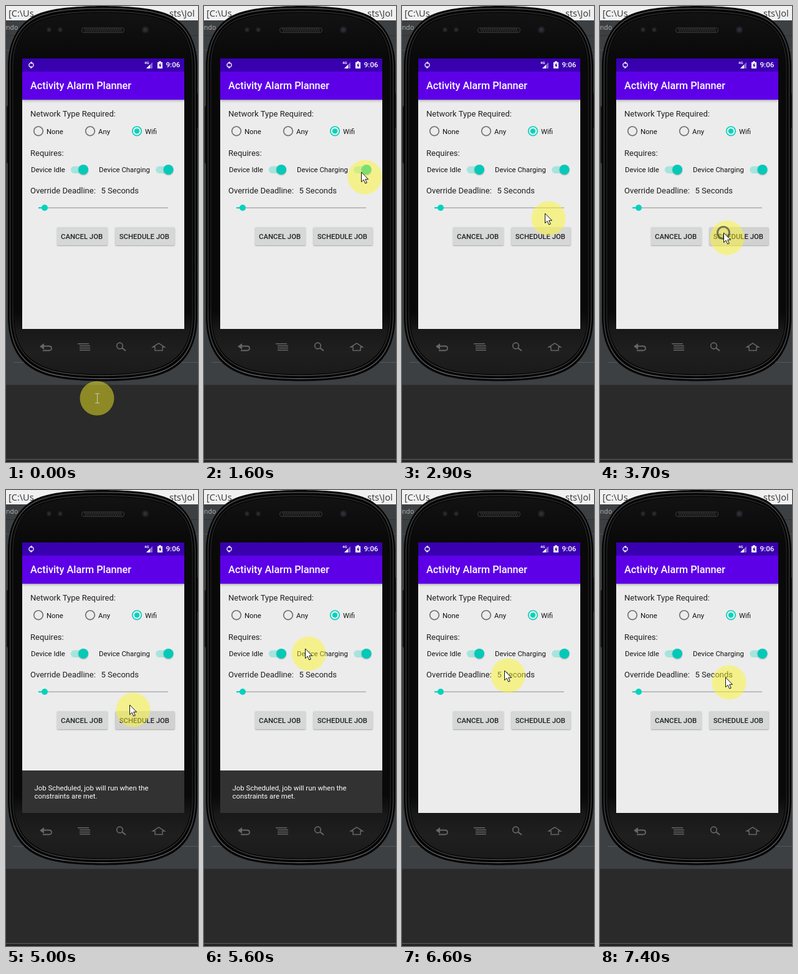
Recreate the animation shown at these times as an HTML page with a canvas. Size 308 px wide and 730 px high, loop 8 s.

```html
<!DOCTYPE html>
<html lang="en">
<head>
<meta charset="utf-8">
<title>Job demo</title>
<style>
  html, body { margin: 0; width: 100%; height: 100%; overflow: hidden; background: #2a2a2a; }
  canvas { display: block; }
</style>
</head>
<body>
<canvas id="stage" width="308" height="730"></canvas>
<script>
const ctx = document.getElementById('stage').getContext('2d');
const LOOP = 8000, STEP = 100;
const TEAL = '#04d2bd', INK = '#212121';

// Pointer highlight centre: [ms, x, y]
const route = [
  [0, 146, 628], [800, 146, 628], [900, 142, 590], [1100, 130, 420],
  [1300, 165, 270], [1400, 205, 233], [1500, 245, 250], [1600, 258, 274],
  [1700, 258, 268], [1800, 252, 240], [1900, 225, 198], [2000, 190, 182],
  [2100, 150, 200], [2200, 118, 250], [2300, 108, 313], [2400, 117, 302],
  [2500, 140, 296], [2600, 179, 288], [2700, 222, 264], [2800, 256, 292],
  [2900, 235, 340], [3000, 204, 364], [3100, 204, 364], [3300, 204, 371],
  [4900, 204, 371], [5000, 204, 352], [5200, 190, 290], [5400, 178, 236],
  [5600, 168, 262], [5800, 166, 288], [6000, 170, 297], [6600, 170, 297],
  [6700, 171, 286], [6800, 177, 286], [7000, 194, 298], [7200, 207, 308]
];

const clamp = v => Math.max(0, Math.min(1, v));
const ease = v => v * v * (3 - 2 * v);

function pointerAt(t) {
  const i = route.findIndex(k => k[0] > t);
  if (i < 0) return route[route.length - 1].slice(1);
  const [t0, x0, y0] = route[i - 1], [t1, x1, y1] = route[i];
  const p = (t - t0) / (t1 - t0);
  return [x0 + (x1 - x0) * p, y0 + (y1 - y0) * p];
}

function rect(x, y, w, h, fill) {
  ctx.fillStyle = fill;
  ctx.fillRect(x, y, w, h);
}

function round(x, y, w, h, r, fill) {
  ctx.beginPath();
  ctx.roundRect(x, y, w, h, r);
  ctx.fillStyle = fill;
  ctx.fill();
}

function disc(x, y, r, fill) {
  ctx.beginPath();
  ctx.arc(x, y, r, 0, 7);
  ctx.fillStyle = fill;
  ctx.fill();
}

function ring(x, y, r, width, color) {
  ctx.beginPath();
  ctx.arc(x, y, r, 0, 7);
  ctx.lineWidth = width;
  ctx.strokeStyle = color;
  ctx.stroke();
}

function line(d, width, color) {
  ctx.lineWidth = width;
  ctx.strokeStyle = color;
  ctx.stroke(new Path2D(d));
}

function shape(d, fill) {
  ctx.fillStyle = fill;
  ctx.fill(new Path2D(d));
}

function text(str, x, y, size = 11.375, color = '#111', weight = 400, family = 'Roboto') {
  ctx.font = `${weight} ${size}px ${family}, sans-serif`;
  ctx.fillStyle = color;
  ctx.fillText(str, x, y);
}

function shadow(blur, dy, alpha, draw) {
  ctx.save();
  ctx.shadowColor = `rgba(0,0,0,${alpha})`;
  ctx.shadowBlur = blur;
  ctx.shadowOffsetY = dy;
  draw();
  ctx.restore();
}

// Vertical gradient from [y, color] pairs over the stage height
function vertical(...stops) {
  const g = ctx.createLinearGradient(0, 0, 0, 730);
  for (const [y, color] of stops) g.addColorStop(y / 730, color);
  return g;
}

// Phone outline, pulled in by d pixels on every side
function outline(d) {
  const l = 3 + d, r = 307 - d, t = 9 + d * 1.1, b = 590 - d * 1.1, k = d * 0.4;
  return `M${62 + k},${t} C${30 + k},${t + 8} ${l + 1},${45 + k} ${l},95 V500
    C${l + 1},${545 - k} ${22 + d},${577 - d} ${62 + k},${b}
    C100,${b + 14} 210,${b + 14} ${248 - k},${b}
    C${288 - d},${577 - d} ${r - 1},${545 - k} ${r},500 V95
    C${r - 1},${45 + k} ${280 - k},${t + 8} ${248 - k},${t}
    C210,${t - 12} 100,${t - 12} ${62 + k},${t} Z`;
}

function desktop() {
  rect(0, 0, 308, 730, '#2a2a2a');
  rect(0, 0, 308, 23, '#f0f0f0');
  text('[C:\\Us', 4, 17, 14.5, '#333', 400, 'Open Sans');
  text('sts\\Jol', 262, 17, 14.5, '#333', 400, 'Open Sans');
  rect(0, 23, 308, 584, '#3d4042');
  text('ndo', 0, 38, 10.5, '#b4b4b4', 400, 'Open Sans');
  rect(0, 47, 308, 1, '#303234');
  rect(0, 70, 308, 1, '#505355');
  rect(12, 570, 296, 1, '#55585a');
  rect(0, 606, 308, 1, '#333537');
  rect(0, 725, 308, 2, '#48494a');
  rect(0, 727, 308, 3, '#222');
}

function speaker() {
  round(121, 34.5, 69, 8.5, 4.2, '#3c3c3c');
  round(122, 35.5, 67, 6.5, 3.2, '#121212');
  for (let x = 126; x < 186; x += 3) {
    rect(x, 36.5, 1.4, 1.6, '#4c4c4c');
    rect(x + 1, 39.2, 1.4, 1.6, '#444');
  }
}

function phone() {
  round(1, 160, 5, 92, 2, '#141414');
  round(305, 140, 3, 55, 1, '#191919');
  shape(outline(0), '#060606');
  line(outline(3.5), 1.2, vertical([0, '#5a5a5a'], [120, '#3c3c3c'], [480, '#3c3c3c'], [590, '#707070']));
  line(outline(8), 1, vertical([0, '#3c3c3c'], [120, '#2a2a2a'], [480, '#2a2a2a'], [590, '#5c5c5c']));
  shape(outline(10), vertical([0, '#141414'], [84, '#090909'], [490, '#090909'], [520, '#191919'], [555, '#1f1f1f'], [595, '#191919']));

  speaker();
  for (const x of [69, 87]) {
    disc(x, 38, 4.2, '#1c1c1c');
    disc(x, 38, 2.4, '#2c2c2c');
  }
  disc(223.5, 38, 6, '#1c1a1e');
  disc(223.5, 38, 3.5, '#302b34');

  const gray = '#666';
  shape('M54,545 L61,540 V550 Z', gray);
  line('M60,544.5 H69 Q73,544.5 73,548 Q73,551.5 69,551.5 H59', 1.8, gray);
  for (let i = 0; i < 4; i++) rect(i ? 118 : 115, 540 + i * 3.4, i ? 17 : 18, 1.5, gray);
  ring(182.5, 544, 4.8, 1.7, gray);
  line('M186.2,547.5 L192,552', 2.2, gray);
  line('M235.5,546 L245,539.8 L254.5,546 H251 V551.5 H239 V546 Z', 1.5, gray);
}

function statusBar() {
  rect(26, 84, 260, 21, '#3900b0');
  ctx.lineWidth = 1.3;
  ctx.strokeStyle = '#fff';
  for (const a of [0, Math.PI]) {
    ctx.save();
    ctx.translate(40.5, 94.5);
    ctx.rotate(a);
    ctx.beginPath();
    ctx.arc(0, 0, 3.6, -1.4, 1.1);
    ctx.stroke();
    shape('M0.8,-6 V-1.2 L-2,-3.6 Z', '#fff');
    ctx.restore();
  }
  text('4G', 222, 93, 6, '#fff', 700);
  shape('M225,100 L235,90 V100 Z', 'rgba(255,255,255,.4)');
  shape('M225,100 L231,94 V100 Z', '#fff');
  shape('M243,90 H245.2 V88.5 H248.8 V90 H251 V100 H243 Z', '#fff');
  shape('M248,90.8 L244.8,95.5 H246.7 V99 L249.4,94.2 H247.6 Z', '#3900b0');
  text('9:06', 256.5, 98, 11.6, '#fff', 500);
}

function radio(x, label, labelX, on) {
  ring(x, 200.3, 7.3, 1.7, on ? TEAL : '#707070');
  if (on) disc(x, 200.3, 4.1, TEAL);
  text(label, labelX, 205);
}

function toggle(label, x, trackX) {
  text(label, x, 266);
  round(trackX, 256.6, 27.5, 11.4, 5.7, '#a6e4de');
  shadow(2, 1, 0.25, () => disc(trackX + 20.3, 262, 8, '#05c9b8'));
}

function button(label, x, w, labelX, fill) {
  shadow(2, 1, 0.3, () => round(x, 354, w, 29, 1.6, fill));
  text(label, labelX, 373, 11.375, INK, 500);
}

function snackbar(t) {
  const shown = ease(clamp((t - 3850) / 250)) - ease(clamp((t - 5650) / 250));
  if (shown <= 0) return;
  ctx.save();
  ctx.translate(0, 68 * (1 - shown));
  rect(26, 449, 260, 68, '#323232');
  ctx.globalAlpha = t < 5000 ? clamp((t - 3900) / 250) : 1;
  text('Job Scheduled, job will run when the', 45.5, 480.5, 11.375, '#fff');
  text('constraints are met.', 45.5, 493.7, 11.375, '#fff');
  ctx.restore();
}

function app(t) {
  ctx.save();
  ctx.beginPath();
  ctx.rect(26, 84, 260, 433);
  ctx.clip();
  rect(26, 84, 260, 433, '#ececec');
  shadow(4, 1, 0.4, () => rect(26, 105, 260, 45, '#5d00e8'));
  statusBar();
  text('Activity Alarm Planner', 39, 133, 16.25, '#fff', 500);

  text('Network Type Required:', 39, 177, 13, INK);
  radio(52, 'None', 65, false);
  radio(135, 'Any', 148, false);
  radio(210, 'Wifi', 223, true);

  text('Requires:', 39, 240, 13, INK);
  toggle('Device Idle', 40, 103.8);
  toggle('Device Charging', 149, 240.3);

  text('Override Deadline:', 39, 300, 13, INK);
  text('5 Seconds', 152.5, 300, 13, INK);
  rect(52, 322.4, 208, 1.4, '#a9a9a9');
  rect(52, 322, 10, 2.2, TEAL);
  disc(62, 323, 5, TEAL);

  const pressed = t >= 3300 && t < 5300;
  button('CANCEL JOB', 82, 81, 88, '#d6d7d7');
  button('SCHEDULE JOB', 175.5, 95, 181.7, pressed ? '#d1d1d1' : '#d6d7d7');
  snackbar(t);
  ctx.restore();
}

function pointer(t) {
  const [x, y] = pointerAt(t);
  disc(x, y, 27.5, 'rgba(252,246,34,.47)');
  if (t >= 3600 && t < 3900) ring(x - 6, y - 8, 9.5, 3, 'rgba(70,70,55,.7)');
  if (y > 607) {
    line(`M${x - 3},${y - 7.5} H${x + 4} M${x + .5},${y - 7} V${y + 7} M${x - 3},${y + 7.5} H${x + 4}`, 1, '#c8c8b8');
    return;
  }
  ctx.save();
  ctx.translate(x - 5.5, y - 8);
  const arrow = 'M0,0 V15.6 L3.6,12.2 L6.2,18 L8.8,17 L6.2,11.3 H11 Z';
  shape(arrow, '#fff');
  line(arrow, 1, '#111');
  ctx.restore();
}

function frame() {
  const t = Math.floor(performance.now() % LOOP / STEP) * STEP;
  desktop();
  phone();
  app(t);
  pointer(t);
  requestAnimationFrame(frame);
}
frame();
</script>
</body>
</html>
```
